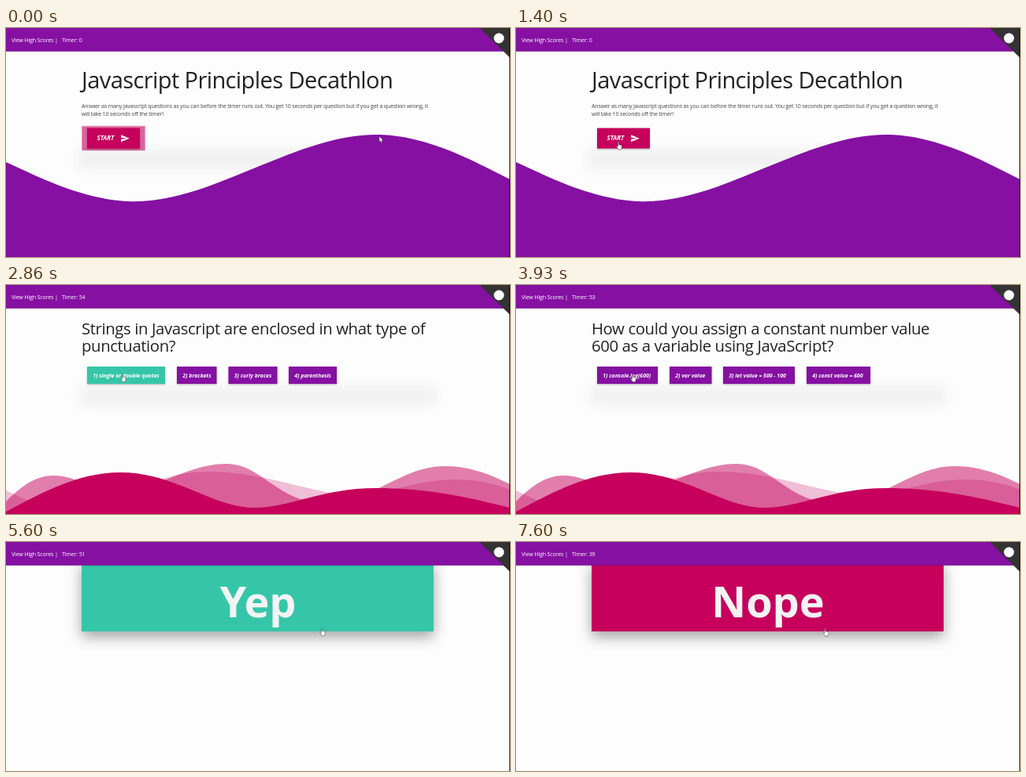
An HTML page that plays this animation: 640 px wide and 292 px high, repeating every 8 s.

```html
<!DOCTYPE html>
<html lang="en">
<head>
<meta charset="utf-8">
<title>Quiz</title>
<style>
  html, body { margin: 0; width: 100%; height: 100%; overflow: hidden; background: #fdfdfd; }
  svg { display: block; width: 100vw; height: 100vh; font-family: "Open Sans", "Noto Sans", sans-serif; }
  .purple { fill: #8510a2; }
  .crimson { fill: #c6005c; }
  .nav { filter: drop-shadow(0 .7px .8px rgba(0,0,0,.38)); }
  .nav-text { font-size: 7.2px; font-weight: 500; letter-spacing: -.03em; fill: #fff; }
  .title { font-size: 29px; letter-spacing: -.02em; fill: #222; }
  .intro { font-size: 7.1px; letter-spacing: -.028em; fill: #444; }
  .question { font-size: 20.3px; letter-spacing: -.018em; fill: #222; }
  .label { font-size: 6.95px; font-weight: 700; font-style: italic; fill: #fff; }
  .banner-text { font-size: 54px; font-weight: 700; fill: #f3f3f3; text-anchor: middle; }
  .banner { filter: drop-shadow(0 7px 9px rgba(0,0,0,.36)); }
  .lift { filter: drop-shadow(0 1px .8px rgba(0,0,0,.3)); }
  .glow { fill: #f1f1f1; filter: blur(6.5px); }
  .hot { fill: #35c6a9; }
  .pulse {
    transform-box: fill-box; transform-origin: center;
    animation: pulse 1s cubic-bezier(.24,0,.38,1) -.15s infinite;
  }
  @keyframes pulse {
    0% { opacity: 1; transform: scale(1); }
    50%, 100% { opacity: 0; transform: scale(1.5); }
  }
  #pointer { animation: roam 8s ease-in-out infinite; }
  @keyframes roam {
    0%, 3% { transform: translate(474px, 138px); }
    15.5%, 28.25% { transform: translate(130px, 145px); }
    32.5%, 54.1% { transform: translate(148px, 113.5px); }
    63.5%, 88.2% { transform: translate(401px, 109.5px); }
    90%, 100% { transform: translate(392.5px, 110px); }
  }
</style>
</head>
<body>
<svg viewBox="0 0 640 292" preserveAspectRatio="none">
  <g id="screens">
    <g id="start">
      <rect class="glow" x="91" y="154" width="456" height="27"/>
      <path class="purple" d="M0 171L26.7 183.3C53.3 195.7 106.7 220.3 160 221.2C213.3 222 266.7 199 320 176.8C373.3 154.7 426.7 133.3 480 136.2C533.3 139 586.7 166 613.3 179.5L640 193V292H0Z"/>
      <text class="title" x="96" y="77">Javascript Principles Decathlon</text>
      <text class="intro" x="96" y="101.5">Answer as many Javascript questions as you can before the timer runs out. You get 10 seconds per question but if you get a question wrong, it</text>
      <text class="intro" x="96" y="111.8">will take 10 seconds off the timer!</text>
      <rect class="crimson pulse" x="103" y="127.6" width="67" height="26"/>
      <rect class="crimson lift button" x="103" y="127.6" width="67" height="26"/>
      <text class="label" x="115.5" y="143.4" style="font-size:7.9px">START</text>
      <path fill="#fff" transform="translate(145 134.6) scale(.51)" d="M2 21L23 12 2 3V10L17 12 2 14Z"/>
    </g>
    <g id="yep">
      <rect class="hot banner" x="96" y="24" width="447" height="90"/>
      <text class="banner-text" x="320" y="95.5">Yep</text>
    </g>
    <g id="nope">
      <rect class="crimson banner" x="96" y="24" width="447" height="90"/>
      <text class="banner-text" x="320" y="95.5">Nope</text>
    </g>
  </g>
  <g id="waves" class="crimson">
    <path opacity=".25" d="M0 262C22 272 40 284 75 284C145 284 180 238 255 238C335 238 385 267 440 267C490 267 520 248 570 248C600 248 622 254 640 261V292H0Z"/>
    <path opacity=".5" d="M0 276C20 256 38 243 60 243C90 243 105 261 145 261C195 261 230 228 280 228C325 228 345 278 405 278C465 278 500 231 558 231C592 231 620 244 640 254V292H0Z"/>
    <path d="M0 289C50 262 95 239 145 239C215 239 262 284 315 284C362 284 400 259 470 259C540 259 590 272 640 284V292H0Z"/>
  </g>
  <rect class="purple nav" x="-5" y="-5" width="650" height="34.8"/>
  <text class="nav-text" x="7" y="17.6">View High Scores |</text>
  <text class="nav-text" x="71" y="17.6">Timer: <tspan id="timer">0</tspan></text>
  <path fill="#333" d="M601.5 0H640V38Z"/>
  <circle cx="626" cy="13" r="6.5" fill="#fff"/>
  <rect x="639" width="1" height="292" opacity=".75"/>
  <g id="pointer" stroke="#222" stroke-width=".5" fill="#fff">
    <path id="arrow" d="M0 0V7.4L1.7 5.9 2.8 8.4 4 7.9 2.9 5.4H5.2Z"/>
    <path id="hand" transform="translate(-2.6)" d="M2 .6c0-.8 1.3-.8 1.3 0v3.2l2.6.6c.9.2 1.2.6 1.1 1.4l-.4 2.6-.6 1.6H2.7L.4 6.5c-.5-.7.3-1.3.9-.8l.7.6z"/>
  </g>
</svg>
<script>
const $ = id => document.getElementById(id);

function add(parent, tag, attrs, text = '') {
  const el = document.createElementNS('http://www.w3.org/2000/svg', tag);
  for (const k in attrs) el.setAttribute(k, attrs[k]);
  el.textContent = text;
  parent.append(el);
  return el;
}

// each option: left edge, width, label
const questions = {
  q1: {
    lines: ['Strings in Javascript are enclosed in what type of', 'punctuation?'],
    options: [[103, 99, '1) single or double quotes'], [217, 50.5, '2) brackets'],
      [282.5, 62, '3) curly braces'], [359, 61, '4) parenthesis']]
  },
  q2: {
    lines: ['How could you assign a constant number value', '600 as a variable using JavaScript?'],
    options: [[103, 77, '1) console.log(600)'], [195, 53.5, '2) var value'],
      [263, 91, '3) let value = 500 - 100'], [369, 81, '4) const value = 600']]
  },
  q3: {
    lines: ['What is an example of the syntax for a single line', 'comment in JavaScript'],
    options: [[103, 124, '1) console.log(This is a comment)'], [242, 91, '2) // This is a comment'],
      [347.5, 78.5, '3) I love JavaScript!']]
  }
};

for (const id in questions) {
  const g = add($('screens'), 'g', { id });
  add(g, 'rect', { class: 'glow', x: 93, y: 128, width: 454, height: 26 });
  questions[id].lines.forEach((s, i) => add(g, 'text', { class: 'question', x: 96, y: 63 + i * 22.4 }, s));
  for (const [x, width, s] of questions[id].options) {
    add(g, 'rect', { class: 'purple lift button', x, y: 104, width, height: 22 });
    add(g, 'text', { class: 'label', x: x + 7.3, y: 117.5 }, s);
  }
}

const scenes = [[0, 'start'], [1600, 'q1'], [2930, 'yep'], [3930, 'q2'], [5260, 'yep'], [6260, 'q3'], [7460, 'nope']];
const ticks = [[0, 0], [2600, 54], [3600, 53], [4600, 52], [5600, 51], [6600, 50], [7460, 40], [7600, 39]];
// the pointer rests here while the page changes, so hover is not refreshed
const idle = [[1600, 2260], [2930, 4330], [5260, 6660], [7460, 8000]];
const lead = 40; // covers the delay between reading the clock and painting

const at = (list, t) => list.findLast(([from]) => from <= t)[1];
const clock = $('pointer').getAnimations()[0];

function draw() {
  const t = ((clock.currentTime || 0) + lead) % 8000;
  const scene = at(scenes, t);
  for (const g of $('screens').children) g.style.display = g.id === scene ? '' : 'none';
  $('waves').style.display = scene[0] === 'q' ? '' : 'none';
  $('timer').textContent = at(ticks, t);

  const still = idle.some(([a, b]) => t >= a && t < b);
  const tip = new DOMMatrix(getComputedStyle($('pointer')).transform);
  let over = false;
  for (const b of $(scene).querySelectorAll('.button')) {
    const { x, y, width, height } = b.getBBox();
    const inside = tip.e >= x && tip.e <= x + width && tip.f >= y && tip.f <= y + height;
    over ||= inside;
    if (scene !== 'start') b.classList.toggle('hot', inside && !still);
  }
  $('hand').style.display = over || still ? '' : 'none';
  $('arrow').style.display = over || still ? 'none' : '';
  requestAnimationFrame(draw);
}
draw();
</script>
</body>
</html>
```
